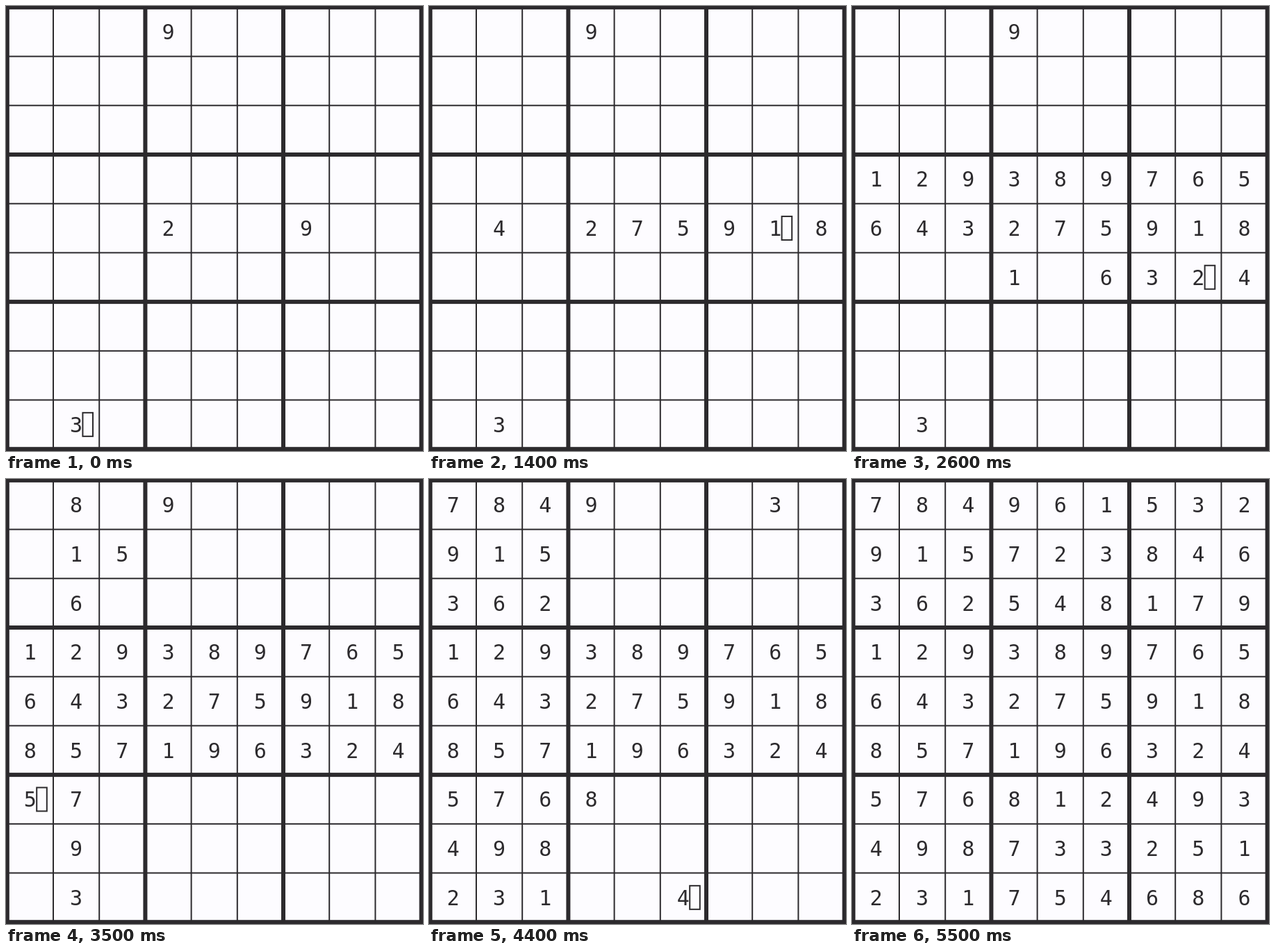
Write an HTML page with a canvas that moves like this. It is 600 px wide and 641 px high and loops after 6300 ms.

```html
<!DOCTYPE html>
<html lang="en">
<head>
<meta charset="utf-8">
<style>
  html, body { margin: 0; width: 100%; height: 100%; overflow: hidden; background: #fdfcff; }
  canvas { display: block; }
</style>
</head>
<body>
<canvas width="600" height="641"></canvas>
<script>
const ctx = document.querySelector('canvas').getContext('2d');
const LOOP = 6300, FIRST = 1000, STEP = 100;
const LEFT = 1.8, TOP = 1.9, CELL_W = 66.2, CELL_H = 70.7;
const INK = '#2c2a2d', PAPER = '#fdfcff';

const solution = [
  '784961532', '915723846', '362548179',
  '129389765', '643275918', '857196324',
  '576812493', '498733251', '231754686'
];

// Cells (row, column) filled at each step; the first one holds the cursor.
const steps = `81 03 43 46
41|44|45|48|47|33|33|53 40 42|53|36
38|34|37|35|30 31 32|56 55|57 58|54|51|52 50
01|61|71|11 21|12|60|70 80|00|20 10|63 62
72|82|22 02|07|85|05|05|06 04 08|27 28 26|25 23 24
64 65 84|16 17 18|67 66 68|78 87 86 88 83
77 76 14 15|13 73 74 75`.split(/[|\n]/).map(step => step.trim().split(' '));

function drawGrid() {
  ctx.fillStyle = PAPER;
  ctx.fillRect(0, 0, 600, 641);
  ctx.fillStyle = INK;
  for (let i = 0; i <= 9; i++) {
    const weight = i % 3 ? 2 : 6;
    ctx.fillRect(LEFT + i * CELL_W - weight / 2, 0, weight, 641);
    ctx.fillRect(0, TOP + i * CELL_H - weight / 2, 600, weight);
  }
}

function drawCell([row, col], hasCursor) {
  const x = LEFT + (+col + 0.5) * CELL_W;
  const y = TOP + (+row + 0.5) * CELL_H;
  ctx.fillText(solution[row][col], x, y + 11);
  if (hasCursor) ctx.strokeRect(x + 9.3, y - 17, 14.6, 34);
}

function draw(time) {
  const last = steps.length - 1;
  const now = Math.max(0, Math.min(last, Math.floor((time - FIRST) / STEP) + 1));
  drawGrid();
  ctx.font = '30px "DejaVu Sans Mono", monospace';
  ctx.textAlign = 'center';
  ctx.strokeStyle = INK;
  ctx.lineWidth = 2;
  steps.slice(0, now + 1).forEach((cells, i) => {
    // A repeated cell marks a step in which nothing new is filled.
    if (i && cells[0] === steps[i - 1][0]) return;
    cells.forEach(cell => drawCell(cell, now < last && cell === steps[now][0]));
  });
}

const start = performance.now();
(function tick() {
  draw((performance.now() - start) % LOOP);
  requestAnimationFrame(tick);
})();
</script>
</body>
</html>
```
